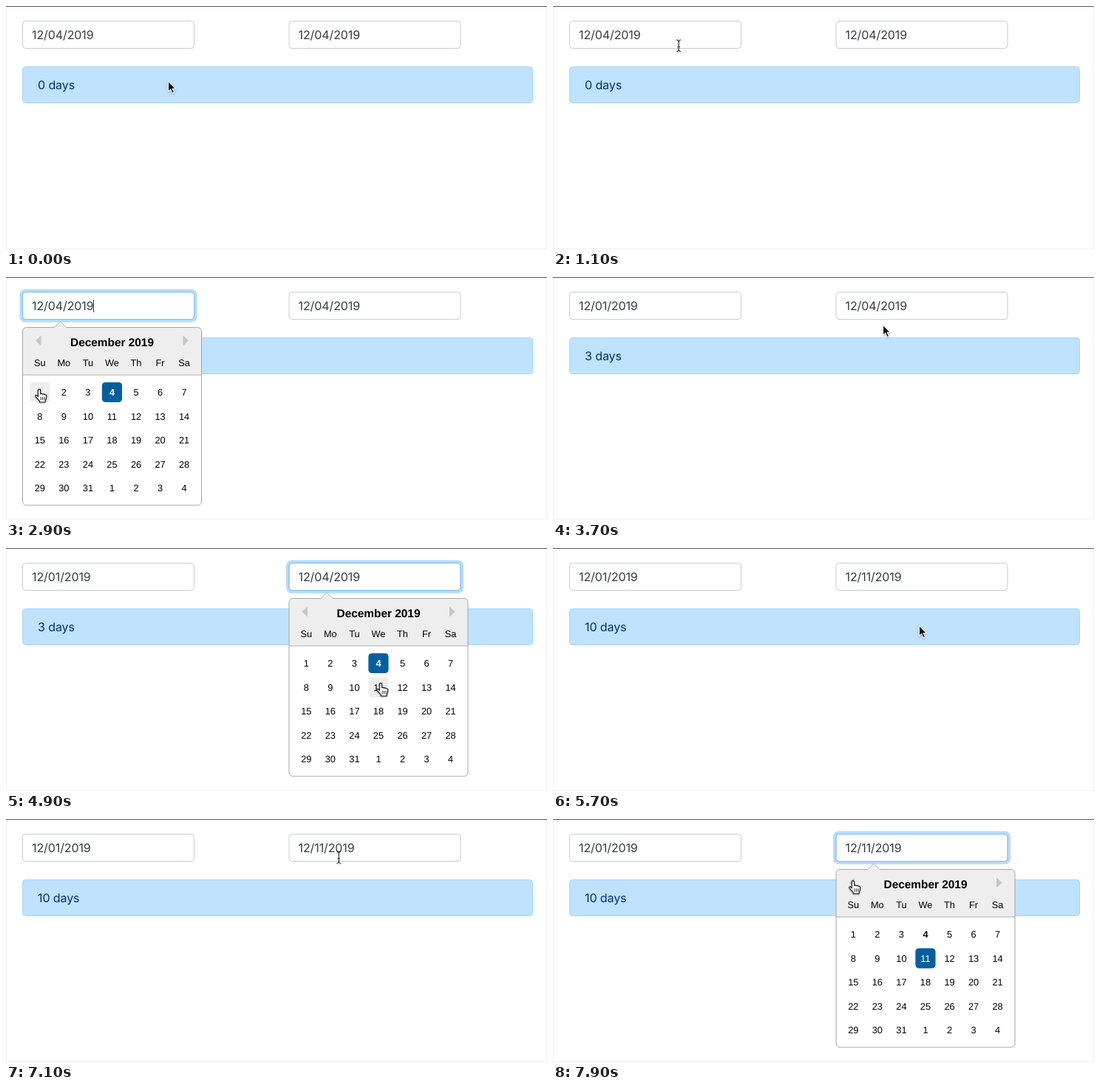
An HTML page that plays this animation: 732x330 px, repeating every 8000 ms.

```html
<!DOCTYPE html>
<html lang="en">
<head>
<meta charset="utf-8">
<title>Date range</title>
<style>
  html, body { margin: 0; width: 100%; height: 100%; overflow: hidden; background: #fff; }
  svg { display: block; width: 732px; height: 330px; text-rendering: geometricPrecision; }
  .ui { font: 16px Inter, sans-serif; letter-spacing: -0.1px; }
  .cal { font: 12.8px "Liberation Sans", Arial, sans-serif; text-anchor: middle; fill: #000; }
  .cal .title { font-size: 15.4px; font-weight: bold; }
  .pointer { filter: drop-shadow(0 1px 1px rgba(0, 0, 0, .3)); }
</style>
</head>
<body>
<svg id="stage" viewBox="0 0 732 330" xmlns="http://www.w3.org/2000/svg"></svg>
<script>
const LOOP = 8000, STEP = 200, MOVE = 700, BLINK = 1100;
const SHIFT = 360.5, COL = 32.55, CELL = 27.2, FIRST_X = 45.8, FIRST_Y = 156.5;
const WEEKDAYS = ['Su', 'Mo', 'Tu', 'We', 'Th', 'Fr', 'Sa'];
const stage = document.getElementById('stage');

// Places where the pointer comes to rest
const stops = [
  { at: 500, x: 219, y: 102 },
  { at: 1300, x: 158, y: 42 },
  { at: 1900, x: 143, y: 126 },
  { at: 2700, x: 45, y: 153 },
  { at: 3700, x: 446, y: 65 },
  { at: 4100, x: 444, y: 44 },
  { at: 4900, x: 507, y: 184 },
  { at: 5900, x: 492, y: 86 },
  { at: 7300, x: 440, y: 44 },
  { at: 7900, x: 406, y: 84.5 }
];

const sessions = [
  { field: 0, open: 1340, close: 3050, pick: 1 },
  { field: 1, open: 4050, close: 5250, pick: 11 },
  { field: 1, open: 7250, close: Infinity }
];

const clamp = v => Math.max(0, Math.min(1, v));
const ease = u => u * u * (3 - 2 * u);
const text = (x, y, s, attrs = '') => `<text x="${x}" y="${y}" ${attrs}>${s}</text>`;
const rect = (x, y, w, h, r, attrs) =>
  `<rect x="${x}" y="${y}" width="${w}" height="${h}" rx="${r}" ${attrs}/>`;
const cellX = i => FIRST_X + (i % 7) * COL;
const cellY = i => FIRST_Y + Math.floor(i / 7) * COL;

function pointerAt(t) {
  let { at, x, y } = stops[0];
  for (const s of stops.slice(1)) {
    const time = Math.min(MOVE, s.at - at);
    const u = ease(clamp((t - s.at) / time + 1));
    x += (s.x - x) * u;
    y += (s.y - y) * u;
    at = s.at;
  }
  return [x, y];
}

function input(field, value, ring, caret) {
  const x = 22.5 + field * SHIFT;
  return rect(x - 2, 18.5, 236, 41, 5.5, `fill="none" stroke="#b5dcff" stroke-width="4" opacity="${ring}"`) +
    rect(x, 20.5, 232, 37, 4, 'fill="#fff" stroke="#c6cbd3"') +
    rect(x, 20.5, 232, 37, 4, `fill="none" stroke="#74bdff" opacity="${ring}"`) +
    text(x + 12.5, 45.3, value, 'class="ui" fill="#363c45"') +
    (caret ? `<path d="M${x + 96} 31v17" stroke="#333"/>` : '');
}

function calendar(field, selected, hover) {
  let s = `<g class="cal" transform="translate(${field * SHIFT} 0)">` +
    rect(22.5, 68.5, 242, 241.5, 5, 'fill="#fff"') +
    '<path d="M22.5 133V73.5q0-5 5-5h232q5 0 5 5V133z" fill="#eee"/>' +
    '<path d="M22.5 133h242" stroke="#aeaeae"/>' +
    rect(22.5, 68.5, 242, 241.5, 5, 'fill="none" stroke="#a6a6a6"') +
    '<path d="M65 69.2l8.5-8.7l8.5 8.7" fill="#eee" stroke="#b4b4b4"/>' +
    '<path d="M65.5 69.5h16" stroke="#eee" stroke-width="1.5"/>' +
    '<path d="M40 86.5l7.5-7v14zM247 86.5l-7.5-7v14z" fill="#c6c6c6"/>' +
    text(143.5, 94.3, 'December 2019', 'class="title"');
  WEEKDAYS.forEach((d, i) => s += text(cellX(i), 121, d));
  for (let i = 0; i < 35; i++) {
    const on = i + 1 === selected, x = cellX(i), y = cellY(i);
    if (on || i === hover)
      s += rect(x - CELL / 2, y - CELL / 2, CELL, CELL, 4.8, `fill="${on ? '#045f9f' : '#eee'}"`);
    s += text(x, y + 4.6, i % 31 + 1,
      (on ? 'fill="#fff" ' : '') + (i === 3 ? 'font-weight="bold"' : ''));
  }
  return s + '</g>';
}

function hoverCell(x, y) {
  for (let i = 0; i < 35; i++)
    if (Math.hypot(x - cellX(i), y - cellY(i)) < CELL / 2) return i;
  return -1;
}

const shapes = {
  arrow: '<path d="M.5 0v14.2l3.2-3l2.4 5.4l2.5-1.1l-2.3-5.2h4.2z" fill="#111" stroke="#fff" stroke-width="1.1"/>',
  beam: '<path d="M-3-8q3 0 3 2.5q0-2.5 3-2.5M0-6V6M-3 8q3 0 3-2.5q0 2.5 3 2.5M-1.5 1.5h3" fill="none" stroke="#222"/>',
  hand: '<g transform="translate(0 -.6) scale(1.1)" stroke="#111" stroke-linejoin="round">' +
    '<path d="M-1.5 9V1.5a1.5 1.5 0 0 1 3 0V6q1-1.2 2.5.2q1.5-.9 2.6.6q2.3-.4 2.3 2.2' +
    'q0 3-1.5 5v2h-7v-1.5q-2.9-3-5.1-5.7q-.3-1.8 1.5-1.5z" fill="#fff"/>' +
    '<path d="M2 9.5v4m2.2-4v4m2.2-4v4" stroke-width=".8"/></g>'
};

function pointerKind(x, y, field, hover) {
  const lx = x > SHIFT ? x - SHIFT : x;
  const near = nx => Math.abs(lx - nx) < 8 && Math.abs(y - 86) < 10;
  if (hover >= 0 || field >= 0 && (near(44) || near(243))) return 'hand';
  return y > 20 && y < 58 && lx > 22 && lx < 255 ? 'beam' : 'arrow';
}

function draw(t) {
  const days = [4, 4], ring = [0, 0];
  let field = -1, caret = -1;
  for (const s of sessions) {
    ring[s.field] += clamp((t - s.open) / 250) * clamp(1 - (t - s.close) / 150);
    if (t >= s.close) days[s.field] = s.pick;
    else if (t >= s.open) {
      field = s.field;
      if ((t - s.open) % BLINK < BLINK / 2) caret = field;
    }
  }
  const [x, y] = pointerAt(t);
  const hover = field < 0 ? -1 : hoverCell(x - field * SHIFT, y);

  stage.innerHTML =
    '<path d="M.5 1v328.5h731V1" fill="none" stroke="#f0f0f0"/>' +
    '<path d="M0 .5h732" stroke="#55585b"/>' +
    days.map((d, i) =>
      input(i, `12/${String(d).padStart(2, '0')}/2019`, ring[i], caret === i)).join('') +
    rect(22.5, 82.5, 690, 49, 4, 'fill="#bfe2ff" stroke="#a7d6ff"') +
    text(43, 113.3, `${days[1] - days[0]} days`, 'class="ui" fill="#022f6e"') +
    (field < 0 ? '' : calendar(field, days[field], hover)) +
    `<g class="pointer" transform="translate(${x} ${y})">${shapes[pointerKind(x, y, field, hover)]}</g>`;
}

// The picture advances five times a second
const start = performance.now();
let shown = -1;
function tick() {
  const t = (performance.now() - start) % LOOP;
  const step = Math.max(0, Math.floor((t - 100) / STEP) * STEP + 100);
  if (step !== shown) draw(shown = step);
  requestAnimationFrame(tick);
}
tick();
</script>
</body>
</html>
```
